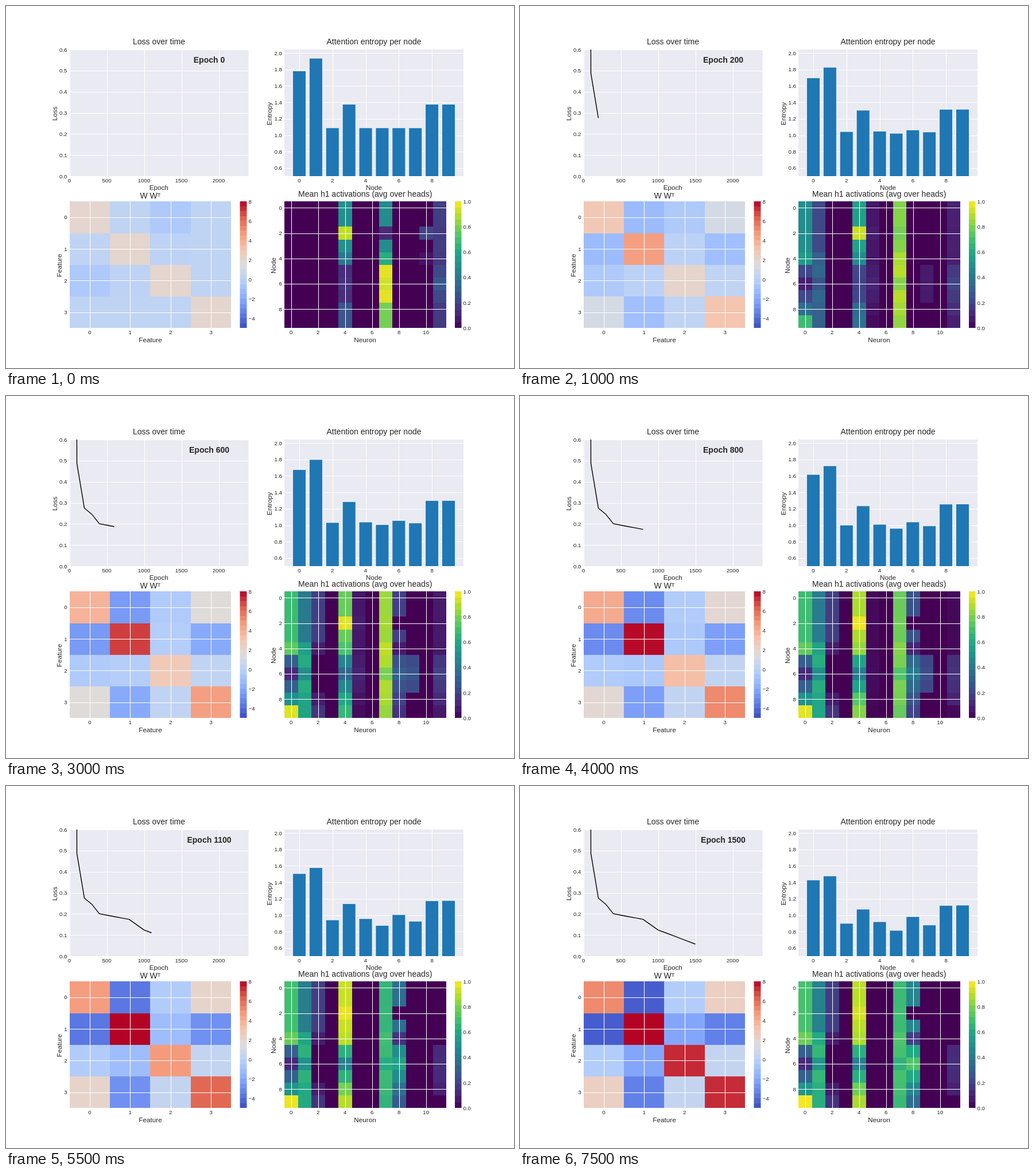
These frames come from a looping animation (885x632 px, 8 s). An HTML page with a canvas:

```html
<!DOCTYPE html>
<html lang="en">
<head>
<meta charset="utf-8">
<title>Training dashboard</title>
<style>
  html, body { margin: 0; width: 100%; height: 100%; overflow: hidden; background: #fff; }
  canvas { display: block; }
</style>
</head>
<body>
<canvas id="stage" width="885" height="632"></canvas>
<script>
const ctx = document.getElementById('stage').getContext('2d');
const STEP = 500, STEPS = 16;
const INK = '#262626', PANEL = '#eaeaf2', BAR = '#1f77b4';
const FONT = '"Liberation Sans", Arial, sans-serif';

const viridis = ['440154', '482475', '414487', '355f8d', '2a788e', '21918c',
  '22a884', '44bf70', '7ad151', 'bddf26', 'fde725'].map(rgb);
const coolwarm = ['3b4cc0', '6282ea', '8db0fe', 'b8d0f9', 'dddddd',
  'f5c4ad', 'f49a7b', 'de604d', 'b40426'].map(rgb);

function rgb(hex) {
  return [0, 2, 4].map(i => parseInt(hex.slice(i, i + 2), 16));
}

function lerp(a, b, t) {
  return a + (b - a) * t;
}

// Straight segments through [step, value] points, held flat at both ends.
function path(...points) {
  return s => {
    const i = points.findIndex(p => p[0] > s);
    if (i === 0) return points[0][1];
    if (i < 0) return points[points.length - 1][1];
    const [s0, v0] = points[i - 1], [s1, v1] = points[i];
    return lerp(v0, v1, (s - s0) / (s1 - s0));
  };
}

// Moves from a to b over the loop; power < 1 is quick at first, > 1 late.
function grow(a, b, power = 1) {
  return s => lerp(a, b, (s / (STEPS - 1)) ** power);
}

const loss = path([1, .487], [2, .275], [3, .246], [4, .201], [8, .174], [10, .124], [15, .057]);

// Attention starts uniform over the neighbours, then sharpens.
const degrees = [6, 7, 3, 4, 3, 3, 3, 3, 4, 4];
const sharpEntropy = [1.428, 1.477, .9, 1.073, .92, .815, .982, .88, 1.118, 1.122];
const sharpen = path([0, 0], [2, .24], [6, .3], [9, .55], [11, .78], [15, 1]);
const entropy = (n, s) => lerp(Math.log(degrees[n]) - .01, sharpEntropy[n], sharpen(s));

// Upper triangle of the symmetric matrix.
const gram = [
  [grow(2, 5.2, .65), grow(.2, -4.5, .6), grow(-.5, -.3), grow(.2, 2.4, .45)],
  [grow(2, 10.6, .6), grow(.1, -2.1, 2), grow(.2, -3.4, .55)],
  [grow(2, 7.35, 2.2), grow(.2, .4)],
  [grow(2, 7.3, .8)]
];
const gramAt = (r, c, s) => gram[Math.min(r, c)][Math.abs(r - c)](s);

// Nodes with the same role share one activation per neuron.
const roles = [0, 0, 1, 0, 2, 3, 4, 3, 5, 6];
const neurons = {};
function neuron(index, profile, level, first = profile, settle = () => 1) {
  neurons[index] = (node, s) => {
    const role = roles[node];
    return level(s) * lerp(first[role], profile[role], settle(s));
  };
}
neuron(0, [.68, .68, .75, .3, .12, .5, .95], path([0, 0], [2, .72], [6, 1], [15, 1.04]));
neuron(1, [.4, .4, .55, .6, .48, .57, .57], path([0, 0], [2, .55], [4, 1], [15, 1.1]));
neuron(2, [.18, .18, .08, 0, 0, .08, .15], path([2, 0], [6, 1]));
neuron(4, [.92, .96, .9, .65, .45, .8, .9], path([0, 1], [9, 1.03], [15, .97]),
  [.5, .9, .4, .13, .15, .27, .27], path([0, 0], [2, .15], [6, .6], [9, .95], [15, 1]));
neuron(5, [.06, .08, .06, .08, .1, .05, .03], path([0, 0], [2, 1], [6, 1], [9, 0]));
neuron(7, [.85, .86, .9, .88, .8, .87, .84], path([6, 1], [11, .77], [15, .8]),
  [.48, .12, .62, .96, .93, .79, .79], path([0, 0], [2, .9], [4, 1]));
neuron(8, [.45, 0, .18, .6, .72, .46, .35], path([2, 0], [6, .42], [11, .8], [15, 1]));
neuron(9, [0, 0, 0, .25, .28, 0, 0], path([0, 0], [2, .28], [4, 1], [9, .8], [11, 0]));
neuron(10, [0, .2, .05, 0, 0, 0, 0], path([0, 1], [2, 0]));
neuron(11, [0, 0, 0, .12, .13, .09, 0], () => 1,
  [.18, .17, .17, .22, .28, .17, .17], path([0, 0], [2, .5], [6, .6], [9, 1]));

function shade(map, t) {
  const p = Math.max(0, Math.min(1, t)) * (map.length - 1);
  const i = Math.min(map.length - 2, Math.floor(p));
  return `rgb(${map[i].map((c, k) => Math.round(lerp(c, map[i + 1][k], p - i)))})`;
}

function range(from, to, step = 1) {
  const n = Math.round((to - from) / step);
  return Array.from({ length: n + 1 }, (_, i) => from + i * step);
}

function text(s, x, y, size, align = 'center', weight = 'normal') {
  ctx.font = `${weight} ${size}px ${FONT}`;
  ctx.textAlign = align;
  ctx.fillStyle = INK;
  ctx.fillText(s, x, y);
}

function sideText(s, x, y) {
  ctx.save();
  ctx.translate(x, y);
  ctx.rotate(-Math.PI / 2);
  text(s, 0, 4, 11.7);
  ctx.restore();
}

function box(x0, y0, x1, y1, color) {
  ctx.fillStyle = color;
  ctx.fillRect(x0, y0, x1 - x0, y1 - y0);
}

function line(points, color, width) {
  ctx.beginPath();
  points.forEach(([x, y]) => ctx.lineTo(x, y));
  ctx.strokeStyle = color;
  ctx.lineWidth = width;
  ctx.stroke();
}

function axes(a, xs, ys, xOf, yOf, digits) {
  const snap = v => Math.round(v) + .5;
  for (const v of xs) {
    const x = xOf(v);
    line([[snap(x), a.y0], [snap(x), a.y1]], '#fff', 1);
    text(v, x, a.y1 + 10.5, 9.7);
  }
  for (const v of ys) {
    const y = yOf(v);
    line([[a.x0, snap(y)], [a.x1, snap(y)]], '#fff', 1);
    text(v.toFixed(digits), a.x0 - 4, y + 3.5, 9.7, 'right');
  }
}

function matrix(a, rows, cols, color, xs, ys) {
  const w = (a.x1 - a.x0) / cols, h = (a.y1 - a.y0) / rows;
  const xAt = c => Math.round(a.x0 + c * w), yAt = r => Math.round(a.y0 + r * h);
  for (let r = 0; r < rows; r++)
    for (let c = 0; c < cols; c++)
      box(xAt(c), yAt(r), xAt(c + 1), yAt(r + 1), color(r, c));
  axes(a, xs, ys, v => a.x0 + (v + .5) * w, v => a.y0 + (v + .5) * h, 0);
}

function colorbar(x, width, map, bands, lo, hi, ticks, digits) {
  const top = 341.3, height = 221;
  const yAt = i => Math.round(top + height * (1 - i / bands));
  for (let i = 0; i < bands; i++)
    box(x, yAt(i + 1), x + width, yAt(i), shade(map, (i + .5) / bands));
  for (const v of ticks) {
    const label = v.toFixed(digits).replace('-', '\u2212');
    text(label, x + width + 3, top + height * (hi - v) / (hi - lo) + 3.5, 9.7, 'left');
  }
}

function drawLoss(s) {
  const a = { x0: 110.5, y0: 76, x1: 422.5, y1: 297 };
  const xOf = e => 110.5 + e * .13, yOf = v => 297 - v * 368.3;
  box(a.x0, a.y0, a.x1, a.y1, PANEL);
  axes(a, range(0, 2000, 500), range(0, .6, .1), xOf, yOf, 1);
  if (s > 0) {
    const points = range(1, s).map(i => [xOf(i * 100), yOf(loss(i))]);
    line([[123.4, a.y0], ...points], '#000', 1.4);
  }
  text('Loss over time', 266.5, 67, 14);
  text('Epoch', 266.3, 321, 11.7);
  sideText('Loss', 84.5, 188);
  text(`Epoch ${s * 100}`, 354, 98.5, 14, 'center', 'bold');
}

function drawEntropy(s) {
  const a = { x0: 485, y0: 76, x1: 797, y1: 297 };
  const xOf = n => 511 + n * 28.89, yOf = v => 82 + (2 - v) * 143.5;
  box(a.x0, a.y0, a.x1, a.y1, PANEL);
  axes(a, range(0, 8, 2), range(.6, 2, .2), xOf, yOf, 1);
  for (let n = 0; n < 10; n++) {
    const l = xOf(n) - 11.5, r = xOf(n) + 11.5, top = yOf(entropy(n, s));
    box(l, top, r, a.y1, BAR);
    line([[l, a.y1], [l, top], [r, top], [r, a.y1]], '#fff', .8);
  }
  text('Attention entropy per node', 641, 67, 14);
  text('Node', 641, 321, 11.7);
  sideText('Entropy', 459, 188);
}

function drawGram(s) {
  const a = { x0: 110.6, y0: 341.2, x1: 392.4, y1: 562.4 };
  const color = (r, c) => shade(coolwarm, (gramAt(r, c, s) + 5) / 13);
  matrix(a, 4, 4, color, range(0, 3), range(0, 3));
  colorbar(407.5, 12, coolwarm, 26, -5, 8, range(-4, 8, 2), 0);
  text('W W', 233.5, 336, 14, 'left');
  text('T', 263.8, 333, 9, 'left');
  text('Feature', 251.5, 587, 11.7);
  sideText('Feature', 92.5, 453);
}

function drawHeat(s) {
  const a = { x0: 485, y0: 341.2, x1: 767, y1: 562.4 };
  const color = (r, c) => shade(viridis, neurons[c] ? neurons[c](r, s) : 0);
  matrix(a, 10, 12, color, range(0, 10, 2), range(0, 8, 2));
  colorbar(782, 11.5, viridis, 21, 0, 1, range(0, 1, .2), 1);
  text('Mean h1 activations (avg over heads)', 625.7, 332.5, 14);
  text('Neuron', 625.5, 587, 11.7);
  sideText('Node', 466, 453);
}

function draw(s) {
  box(0, 0, 885, 632, '#fff');
  drawLoss(s);
  drawEntropy(s);
  drawGram(s);
  drawHeat(s);
}

const start = performance.now();
let shown = -1;

function tick() {
  const s = Math.floor((performance.now() - start) / STEP) % STEPS;
  if (s !== shown) draw(shown = s);
  requestAnimationFrame(tick);
}
tick();
</script>
</body>
</html>
```
